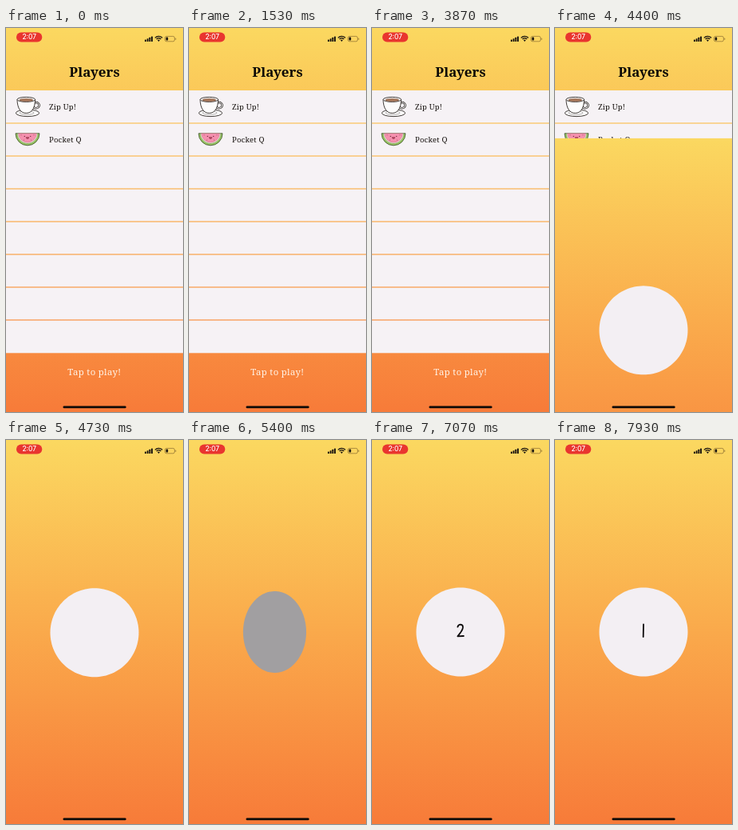
An HTML page with a canvas for the animation above (8 s loop, 222 by 480 pixels).

```html
<!DOCTYPE html>
<html lang="en">
<head>
<meta charset="utf-8">
<title>Players</title>
<style>
html, body { margin: 0; width: 100%; height: 100%; overflow: hidden; background: #f9a94b; }
canvas { display: block; width: 222px; height: 480px; }
</style>
</head>
<body>
<canvas id="stage"></canvas>
<script>
const W = 222, H = 480, LOOP = 8000;
const SLIDE_START = 4268, SLIDE_RATE = 0.0188;
const FLIP_START = 5250, FLIP_GAP = 1000, FLIP_TIME = 500;
const RADIUS = 55.5, DEPTH = 360;
const SERIF = '"Noto Serif", serif';
const INK = '#17120f';

const canvas = document.getElementById('stage');
const ratio = window.devicePixelRatio || 1;
canvas.width = W * ratio;
canvas.height = H * ratio;
const ctx = canvas.getContext('2d');

const sky = ctx.createLinearGradient(0, 0, 0, H);
sky.addColorStop(0, '#fbd860');
sky.addColorStop(0.5, '#faa94b');
sky.addColorStop(1, '#f77b39');

const digits = [
  null,
  new Path2D('M0 -9.5 L-0.3 6'),
  new Path2D('M-3.6 -6.3 Q-2.8 -9.3 0.2 -9.3 Q3.2 -9 3 -5.6 Q2.7 -2 -3.6 5.4 L3.9 5'),
  new Path2D('M-3.4 -9 L3.2 -9 L-0.6 -3.2 Q3.5 -3 3.4 1 Q3 5.6 -0.4 5.7 Q-2.8 5.6 -3.6 3.6')
];

function text(str, x, y, font, color, align = 'left', spacing = 0) {
  ctx.font = font;
  ctx.fillStyle = color;
  ctx.textAlign = align;
  ctx.letterSpacing = spacing + 'px';
  ctx.fillText(str, x, y);
}

function shape(path, fill, stroke, width = 1) {
  if (fill) {
    ctx.fillStyle = fill;
    ctx.fill(path);
  }
  if (stroke) {
    ctx.strokeStyle = stroke;
    ctx.lineWidth = width;
    ctx.stroke(path);
  }
}

function ellipse(x, y, rx, ry, start = 0, end = Math.PI * 2) {
  const p = new Path2D();
  p.ellipse(x, y, rx, ry, 0, start, end);
  if (end - start < 6) p.closePath();
  return p;
}

function pill(x, y, w, h, r) {
  const p = new Path2D();
  p.roundRect(x, y, w, h, r);
  return p;
}

function drawCup() {
  shape(ellipse(27, 106.3, 14.6, 4.3), '#fbfafa', INK, 0.8);
  shape(ellipse(26, 106, 9, 2.3), null, '#6d6868', 0.5);
  shape(ellipse(37.6, 96.6, 4, 3.6), null, INK, 2.5);
  shape(ellipse(37.6, 96.6, 4, 3.6), null, '#fbfafa', 1.1);
  shape(new Path2D('M14 89.5 C14.2 99 17.5 106.4 25.3 106.4 C33 106.4 36.4 99 36.6 89.5 Z'),
    '#fdfcfc', INK, 0.8);
  shape(ellipse(25.3, 89.4, 11.3, 3), '#fdfcfc', INK, 0.8);
  shape(ellipse(25.3, 90, 8.6, 1.7), '#a87658', '#6b4632', 0.4);
}

function drawMelon() {
  const half = r => ellipse(27, 131.8, r, r, 0, Math.PI);
  shape(half(15), '#9ccb62', '#3a4a2c', 0.8);
  shape(half(12.8), '#f3f5e2', '#5a7a40', 0.5);
  shape(half(11.4), '#f590ae', '#b8607c', 0.4);
  ctx.fillStyle = '#6a2c40';
  for (const [x, y] of [[23.3, 135.4], [30.7, 135.4]]) ctx.fill(ellipse(x, y, 0.7, 0.7));
  for (const [x, y] of [[19, 133.8], [35, 133.8], [22.5, 140], [31.5, 140]]) {
    ctx.fill(ellipse(x, y, 0.35, 0.55));
  }
  shape(ellipse(27, 136.6, 1.8, 2, 0, Math.PI), '#c0405c', '#6a2c40', 0.4);
}

function drawList() {
  ctx.fillStyle = sky;
  ctx.fillRect(0, 0, W, H);
  ctx.fillStyle = '#f6f2f5';
  ctx.fillRect(0, 78, W, 328.3);
  ctx.fillStyle = sky;
  for (let i = 1; i < 8; i++) ctx.fillRect(0, 77.4 + 41 * i, W, 1.2);
  text('Players', 111, 61, `900 17px ${SERIF}`, '#0c0906', 'center');
  text('Zip Up!', 54, 102, `9.5px ${SERIF}`, INK, 'left', 0.2);
  text('Pocket Q', 54, 143, `9.5px ${SERIF}`, INK, 'left', 0.2);
  text('Tap to play!', 110.7, 434.2, `11.4px ${SERIF}`, '#fff3e6', 'center', 0.3);
  drawCup();
  drawMelon();
}

// One disc turning about its vertical axis, seen in perspective.
function drawDisc(angle, digit) {
  const s = Math.sin(angle), c = Math.abs(Math.cos(angle));
  const scale = 1 - 0.135 * s;
  const side = Math.cos(angle) < 0 ? 1 : -1;
  const light = 1 - 0.53 * s;
  const r = RADIUS * scale;

  ctx.save();
  ctx.translate(111, 240);
  ctx.beginPath();
  for (let i = 0; i < 120; i++) {
    const a = i * Math.PI / 60;
    const x = r * Math.cos(a);
    const near = 1 - side * x * s / DEPTH;
    ctx.lineTo(x * c / near, r * Math.sin(a) / near);
  }
  ctx.closePath();
  ctx.fillStyle = `rgb(${[243, 239, 243].map(v => Math.round(v * light))})`;
  ctx.fill();
  if (digit) {
    ctx.scale(c * scale, scale);
    ctx.lineCap = ctx.lineJoin = 'round';
    shape(digits[digit], null, '#0b090a', 1.8);
  }
  ctx.restore();
}

function drawCountdown(t) {
  ctx.fillStyle = sky;
  ctx.fillRect(0, 0, W, H);
  const since = t - FLIP_START;
  const turn = Math.min(2, Math.floor(since / FLIP_GAP));
  if (turn < 0) return drawDisc(0, 0);

  const p = Math.min(1, (since - turn * FLIP_GAP) / FLIP_TIME);
  const eased = p * p * (3 - 2 * p);
  const before = turn ? 4 - turn : 0;
  drawDisc(eased * Math.PI, eased < 0.5 ? before : 3 - turn);
}

function drawStatus() {
  shape(pill(13, 5.5, 32.3, 12, 6), '#e9352f');
  text('2:07', 29.2, 14.4, '500 8.3px Inter, sans-serif', '#fff', 'center');

  ctx.fillStyle = INK;
  for (let i = 0; i < 4; i++) {
    const h = 2.4 + 1.4 * i;
    ctx.fill(pill(174 + 2.7 * i, 17 - h, 1.9, h, 0.5));
  }

  ctx.strokeStyle = INK;
  ctx.lineWidth = 1.4;
  for (const r of [6.2, 3.8]) {
    ctx.beginPath();
    ctx.arc(191.5, 16.6, r, -Math.PI * 0.76, -Math.PI * 0.24);
    ctx.stroke();
  }
  ctx.beginPath();
  ctx.moveTo(191.5, 17);
  ctx.arc(191.5, 16.6, 2, -Math.PI * 0.76, -Math.PI * 0.24);
  ctx.fill();

  shape(pill(199.4, 10.4, 12, 6.4, 1.9), null, 'rgba(70,45,20,.55)', 0.8);
  shape(pill(200.6, 11.6, 2.6, 4, 0.8), INK);
  shape(pill(212.3, 12.4, 1, 2.4, 0.5), 'rgba(70,45,20,.55)');

  shape(pill(71.5, 472.5, 79.2, 2.8, 1.4), '#0d0907');
}

function slideOffset(t) {
  const k = Math.max(0, t - SLIDE_START) * SLIDE_RATE;
  const y = H * (1 + k) * Math.exp(-k);
  return y < 0.3 ? 0 : y;
}

function draw() {
  const t = performance.now() % LOOP;
  const y = slideOffset(t);
  ctx.setTransform(ratio, 0, 0, ratio, 0, 0);
  if (y > 0) drawList();
  if (y < H) {
    ctx.save();
    ctx.translate(0, y);
    drawCountdown(t);
    ctx.restore();
  }
  drawStatus();
  requestAnimationFrame(draw);
}
draw();
</script>
</body>
</html>
```
